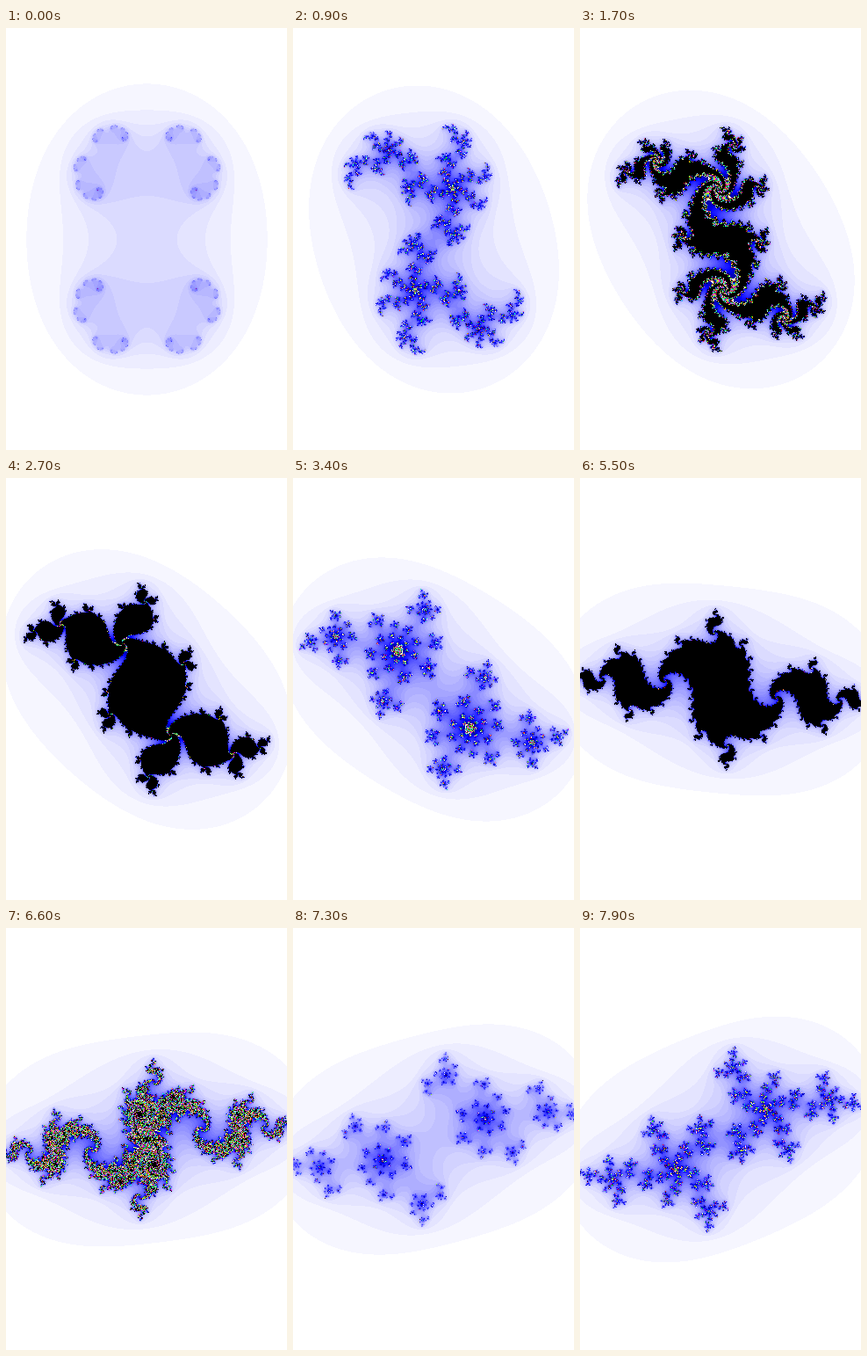
Recreate the animation shown at these times as an HTML page with a canvas. Size 320 by 480 pixels, loop 8 s.

```html
<!DOCTYPE html>
<html>
<head>
<meta charset="utf-8">
<title>Julia set</title>
<style>
html, body { margin: 0; width: 100%; height: 100%; overflow: hidden; background: #fff; }
canvas { display: block; }
</style>
</head>
<body>
<canvas id="stage" width="320" height="480"></canvas>
<script>
const W = 320, H = 480, SCALE = 112, LIMIT = 255;
const LOOP = 8000, STEP = 100, TURN = 3 * Math.PI / 180;
const BLUE = 28, WHEEL = 36;
const ctx = document.getElementById('stage').getContext('2d');
const image = ctx.createImageData(W, H);
const pixels = new Uint32Array(image.data.buffer);

const pack = (r, g, b) => (255 << 24 | b << 16 | g << 8 | r) >>> 0;
const wave = (n, period) => Math.round(127.5 + 127.5 * Math.cos(2 * Math.PI * n / period));

// White fades to blue, darkens, then each channel cycles at its own rate.
function colour(n) {
  if (n >= LIMIT) return pack(0, 0, 0);
  if (n > WHEEL) {
    const m = n - WHEEL - 1;
    return pack(wave(m, 9), wave(m, 7), wave(m, 5));
  }
  const tint = Math.max(0, 255 - 9 * (n - 1));
  return pack(tint, tint, 255 - 12 * Math.max(0, n - BLUE));
}
const palette = Uint32Array.from({ length: LIMIT + 1 }, (_, n) => colour(n));

function escapeCount(x, y, cx, cy) {
  let n = 0;
  while (n < LIMIT) {
    const next = x * x - y * y + cx;
    y = 2 * x * y + cy;
    x = next;
    n++;
    if (x * x + y * y > 4) break;
  }
  return n;
}

function draw(step) {
  const cx = -0.2 + 0.7 * Math.cos(step * TURN);
  const cy = 0.7 * Math.sin(step * TURN);
  for (let py = 0, i = 0; py < H; py++) {
    for (let px = 0; px < W; px++) {
      const n = escapeCount((px - W / 2) / SCALE, (H / 2 - py) / SCALE, cx, cy);
      pixels[i++] = palette[n];
    }
  }
  ctx.putImageData(image, 0, 0);
}

let shown = -1;
const start = performance.now();
function tick() {
  const step = Math.floor((performance.now() - start) % LOOP / STEP);
  if (step !== shown) draw(shown = step);
  requestAnimationFrame(tick);
}
tick();
</script>
</body>
</html>
```
